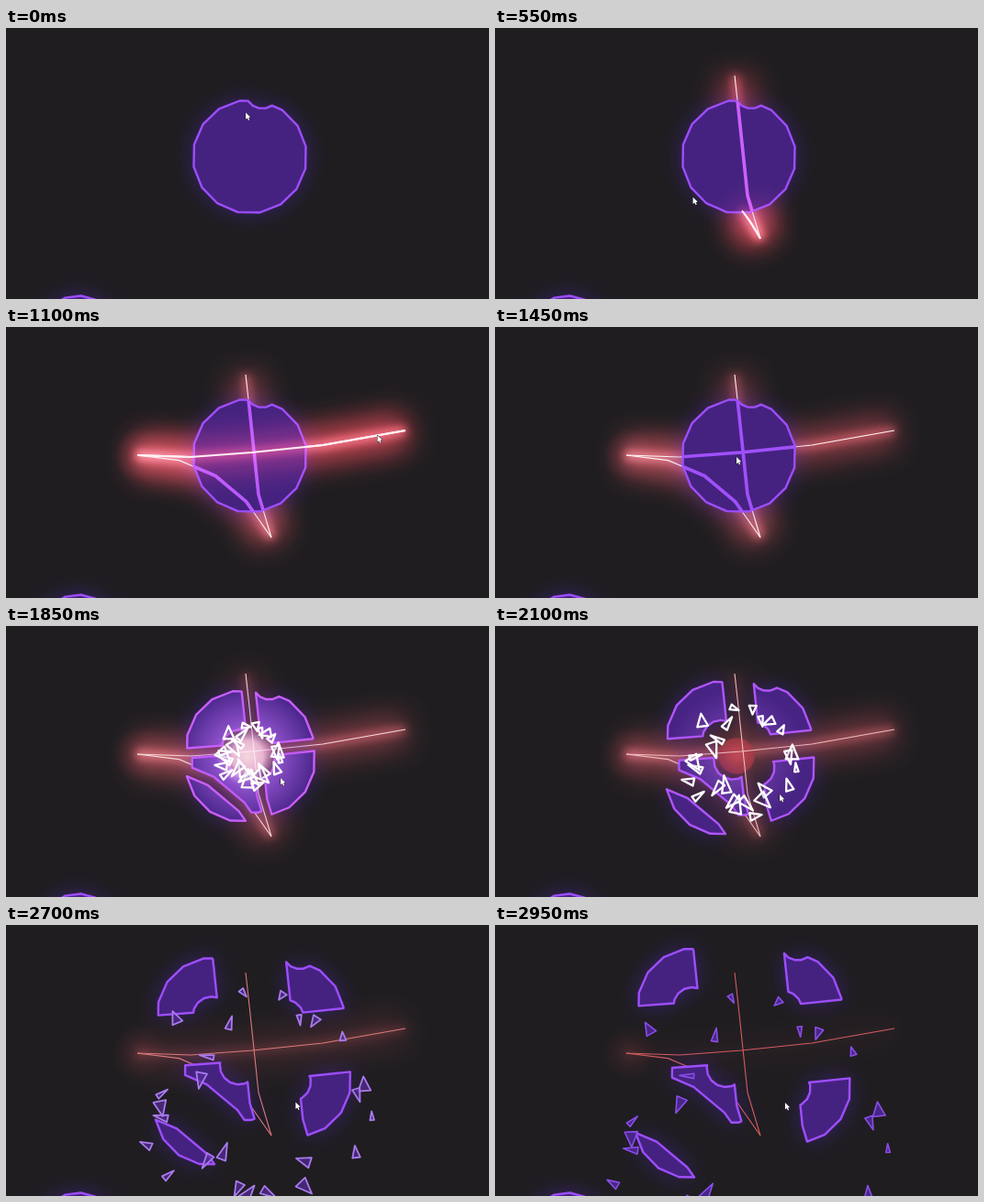
An HTML page with a canvas for the animation above (3000 ms loop, 526 by 296 pixels).

```html
<!DOCTYPE html>
<html>
<head>
<meta charset="utf-8">
<title>Laser slice</title>
<style>
html, body { margin: 0; width: 100%; height: 100%; overflow: hidden; background: #1f1d20; }
canvas { display: block; }
</style>
</head>
<body>
<canvas id="stage" width="526" height="296"></canvas>
<script>
const ctx = document.getElementById('stage').getContext('2d');
const LOOP = 3000, BLAST = 1650, CX = 263, CY = 142, BLAST_R = 20.7, TAU = 2 * Math.PI;

const clamp = x => Math.max(0, Math.min(1, x));
const ramp = (t, a, b) => clamp((t - a) / (b - a));
const smooth = x => x * x * (3 - 2 * x);
const mix = (a, b, k) => a + (b - a) * k;
const rgb = (a, b, k, alpha = 1) => `rgba(${a.map((c, i) => Math.round(mix(c, b[i], k)))},${alpha})`;

let seed = 7;
const random = () => (seed = (seed * 16807) % 2147483647) / 2147483647;

// Geometry: polygons run clockwise on screen
const ring = (x, y, r, start) => Array.from({ length: 16 }, (_, i) => {
  const a = start + i * TAU / 16;
  return [x + r * Math.cos(a), y + r * Math.sin(a)];
});

const curve = (a, c, b, n) => Array.from({ length: n + 1 }, (_, i) => {
  const k = i / n;
  return [0, 1].map(d => mix(mix(a[d], c[d], k), mix(c[d], b[d], k), k));
});

function crossing(a, b, c, d) {
  const ux = b[0] - a[0], uy = b[1] - a[1], vx = d[0] - c[0], vy = d[1] - c[1];
  const det = ux * vy - uy * vx, wx = c[0] - a[0], wy = c[1] - a[1];
  const s = (wx * vy - wy * vx) / det, q = (wx * uy - wy * ux) / det;
  return s >= 0 && s < 1 && q >= 0 && q < 1 ? s : null;
}

// Splits a polygon into the part right of the path and the part left of it
function split(poly, path) {
  const n = poly.length, hits = [];
  for (let k = 1; k < path.length; k++) {
    for (let i = 0; i < n; i++) {
      const a = path[k - 1], b = path[k], s = crossing(a, b, poly[i], poly[(i + 1) % n]);
      if (s !== null) hits.push({ k, i, s, at: [mix(a[0], b[0], s), mix(a[1], b[1], s)] });
    }
  }
  if (hits.length < 2) return [poly];
  const [enter, exit] = hits.sort((p, q) => p.k + p.s - q.k - q.s);
  const inner = [enter.at, ...path.slice(enter.k, exit.k), exit.at];
  const walk = (from, to) => Array.from({ length: (to - from + n) % n }, (_, j) => poly[(from + 1 + j) % n]);
  return [
    [...inner, ...walk(exit.i, enter.i)],
    [...inner.slice().reverse(), ...walk(enter.i, exit.i)]
  ];
}

function bite(poly, x, y, r) {
  const mean = d => poly.reduce((sum, p) => sum + p[d], 0) / poly.length;
  const circle = ring(x, y, r, Math.atan2(y - mean(1), x - mean(0)));
  return split(poly, [...circle, circle[0]]).pop();
}

const disc = bite(ring(265.5, 140.5, 62, .213), 279, 69.5, 18.5);
const lowDisc = ring(78.5, 336, 43.6, .07);

// Laser strokes: drawn from start to end, cutting at cut, glowing until gone
const bend = n => curve([289, 230], [240, 140], [143, 140], n);
const strokes = [
  { start: 100, end: 400, cut: 450, gone: 2300, path: [[261, 52], [265, 88], [275, 183], [289, 230]] },
  { start: 450, end: 800, cut: 900, gone: 2500, live: bend(24), path: bend(4) },
  { start: 890, end: 1100, cut: 1150, gone: 3000, path: [[143, 140], [201, 142], [268, 137], [345, 129], [435, 113]] }
];

// Drift of each slice in px per second
const drifts = [[-9, 11], [-37, -41], [-40, 57], [46, 28], [39, -38]];
const pieces = strokes
  .reduce((polys, s) => polys.flatMap(p => split(p, s.path)), [disc])
  .map((p, i) => ({ drift: drifts[i], shape: bite(p, CX, CY, BLAST_R) }));

// Slow shards are the big ones
const SHARDS = 26;
const shards = Array.from({ length: SHARDS }, (_, i) => {
  const dir = (i + random()) / SHARDS * TAU, reach = Math.sqrt(random()), len = 9 + 13 * (1 - reach) + 6 * random() ** 3;
  const speed = mix(15, 122, reach);
  return { vx: speed * Math.cos(dir), vy: speed * Math.sin(dir), len, wid: len * mix(.35, .9, random()),
    angle: random() * TAU, spin: random() * 2 - 1 };
});

// Time, x, y
const pointer = [[0, 261, 93], [60, 261, 52], [380, 289, 230], [720, 143, 140], [850, 203, 143], [1030, 435, 113],
  [1430, 263, 142], [1650, 263, 142], [1850, 299, 166], [2100, 310, 184], [2500, 315, 193], [3000, 316, 194]];

function trace(points, closed) {
  ctx.beginPath();
  points.forEach(p => ctx.lineTo(...p));
  if (closed) ctx.closePath();
}

const lengthOf = path => path.slice(1).reduce((sum, p, i) => sum + Math.hypot(p[0] - path[i][0], p[1] - path[i][1]), 0);

function radial(x, y, r, stops) {
  const g = ctx.createRadialGradient(x, y, 0, x, y, r);
  stops.forEach(([at, color]) => g.addColorStop(at, color));
  return g;
}

function drawLight(x, y, r, stops) {
  ctx.fillStyle = radial(x, y, r, stops);
  ctx.fillRect(x - r, y - r, 2 * r, 2 * r);
}

function drawShape(points, heat = 0) {
  const base = [69, 34, 128];
  ctx.save();
  trace(points, true);
  ctx.shadowColor = 'rgba(90,40,225,.42)';
  ctx.shadowBlur = 24;
  ctx.fillStyle = radial(CX, CY, 75, [[0, rgb(base, [255, 215, 255], heat)], [.45, rgb(base, [165, 95, 225], heat)],
    [1, rgb(base, [75, 38, 140], heat)]]);
  ctx.fill();
  ctx.shadowBlur = 0;
  ctx.strokeStyle = rgb([158, 78, 253], [215, 100, 250], heat);
  ctx.lineWidth = 2.4;
  ctx.stroke();
  ctx.restore();
}

function strokeLaser(s, t, color, width, blur = 0) {
  const path = t < s.cut && s.live || s.path, part = smooth(ramp(t, s.start, s.end));
  if (!part) return;
  ctx.save();
  if (blur) ctx.filter = `blur(${blur}px)`;
  if (part < 1) ctx.setLineDash([lengthOf(path) * part, 9999]);
  ctx.strokeStyle = color;
  ctx.lineWidth = width;
  trace(path);
  ctx.stroke();
  ctx.restore();
}

function drawGlow(s, t, power) {
  const a = power * (1 - ramp(t, s.end, s.gone) ** 2), cool = ramp(t, s.end, s.end + 500);
  strokeLaser(s, t, rgb([205, 45, 55], [190, 60, 70], cool, a * .62), 36, 15);
  strokeLaser(s, t, rgb([255, 65, 80], [215, 75, 85], cool, a * .7), 9, 5);
}

function drawLasers(t) {
  const color = rgb([255, 248, 248], [212, 92, 95], ramp(t, 1600, 2950));
  ctx.globalCompositeOperation = 'screen';
  strokes.forEach(s => drawGlow(s, t, 1));
  const a = .5 * ramp(t, 800, 850) * (1 - ramp(t, 850, 4200));
  drawLight(146, 140, 30, [[0, `rgba(205,60,70,${a})`], [.4, `rgba(180,50,60,${a * .5})`], [1, 'rgba(160,40,50,0)']]);
  ctx.globalCompositeOperation = 'source-over';
  if (t >= BLAST) {
    const ember = 1 - ramp(t, 2050, 2350);
    drawLight(CX, CY, BLAST_R, [[0, `rgba(205,75,88,${ember})`], [.9, `rgba(165,58,70,${ember})`], [1, 'rgba(165,58,70,0)']]);
  }
  strokes.forEach(s => strokeLaser(s, t, color, t < s.cut ? 2 : 1.1));
}

function drawWhole(t) {
  drawShape(disc);
  ctx.save();
  trace(disc, true);
  ctx.clip();
  strokes.filter(s => t >= s.cut)
    .forEach(s => strokeLaser(s, t, rgb([205, 95, 255], [160, 80, 250], ramp(t, 850, 1400)), 3.6));
  ctx.restore();
  strokes.filter(s => t < s.cut).forEach(s => {
    ctx.globalCompositeOperation = 'screen';
    drawGlow(s, t, .85);
    ctx.globalCompositeOperation = 'source-over';
    strokeLaser(s, t, '#fff0f4', 2);
  });
}

function drawShards(t, sec) {
  const cool = ramp(t, 2150, 2900), spread = .1 + sec, fall = 60 * sec * sec;
  ctx.strokeStyle = rgb([255, 255, 255], [139, 76, 232], cool);
  ctx.fillStyle = rgb([110, 60, 160], [74, 40, 145], cool, .2 + .7 * cool);
  ctx.lineWidth = mix(2.3, 1.6, cool);
  for (const { vx, vy, len, wid, angle, spin } of shards) {
    ctx.save();
    ctx.translate(CX + vx * spread, CY + vy * spread + fall);
    ctx.rotate(angle + spin * sec);
    trace([[-len / 2, -wid / 2], [len / 2, 0], [-len / 2, wid / 2]], true);
    ctx.fill();
    ctx.stroke();
    ctx.restore();
  }
}

function drawBlast(t) {
  const sec = (t - BLAST) / 1000, heat = 1 - ramp(t, 1700, 2300), flash = 1 - ramp(t, 1800, 2080);
  pieces.forEach(({ drift, shape }) => {
    drawShape(shape.map(([x, y]) => [x + drift[0] * sec, y + drift[1] * sec]), heat);
  });
  drawLight(CX, CY, 34, [[0, `rgba(255,245,255,${flash})`], [.5, `rgba(255,225,255,${flash * .9})`], [1, 'rgba(225,140,255,0)']]);
  drawShards(t, sec);
}

function drawPointer(t) {
  const i = pointer.findIndex(k => k[0] > t), a = pointer[i - 1], b = pointer[i], k = ramp(t, a[0], b[0]);
  const arrow = [[0, 0], [0, 7.5], [1.8, 6], [3, 8.6], [4.2, 8], [3.1, 5.5], [5.3, 5.3]];
  ctx.save();
  ctx.translate(mix(a[1], b[1], k), mix(a[2], b[2], k));
  trace(arrow, true);
  ctx.strokeStyle = '#151316';
  ctx.lineWidth = 1;
  ctx.stroke();
  ctx.fillStyle = '#fff';
  ctx.fill();
  ctx.restore();
}

function draw(now) {
  const t = (now - t0 + LOOP) % LOOP;
  ctx.fillStyle = '#1f1d20';
  ctx.fillRect(0, 0, 526, 296);
  drawLasers(t);
  drawShape(lowDisc);
  if (t < BLAST) drawWhole(t);
  else drawBlast(t);
  drawPointer(t);
  requestAnimationFrame(draw);
}

ctx.lineJoin = 'round';
const t0 = performance.now();
draw(t0);
</script>
</body>
</html>
```
